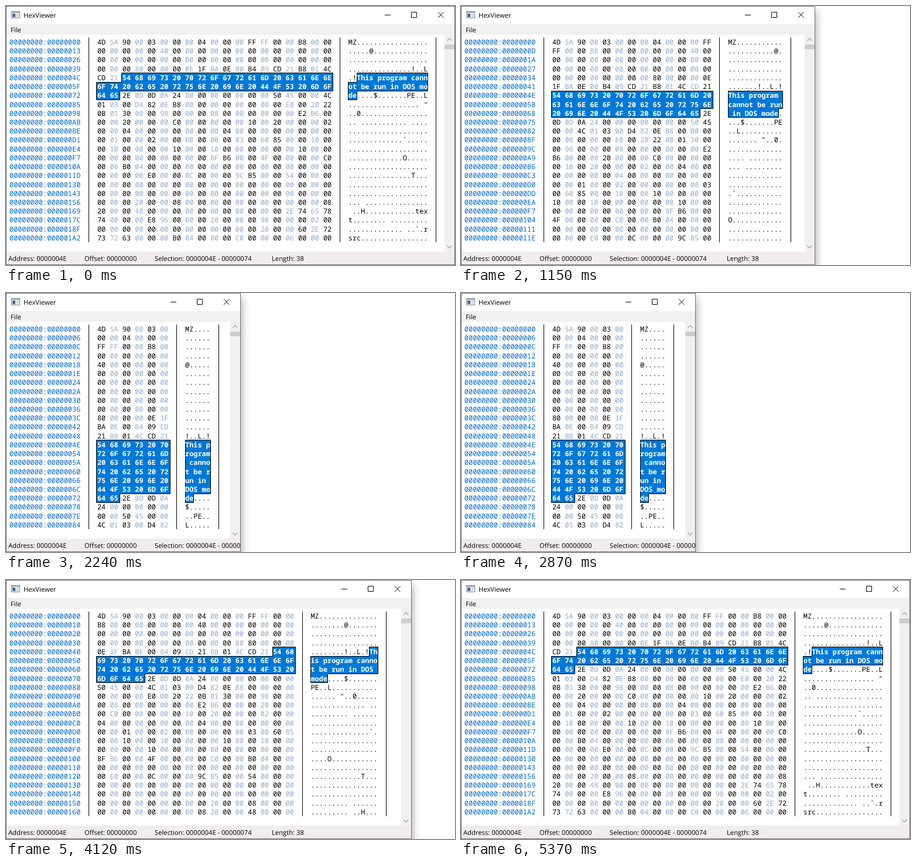
An HTML page for the animation above (5750 ms loop, 767 px wide and 443 px high).

```html
<!DOCTYPE html>
<html lang="en">
<head>
<meta charset="utf-8">
<title>HexViewer</title>
<style>
  html, body { margin: 0; width: 100%; height: 100%; overflow: hidden; background: #fff; }
  svg { display: block; }
  text { white-space: pre; text-rendering: geometricPrecision; }
  .ui { font: 11.25px "Open Sans", "Noto Sans", sans-serif; }
  .mono { font: 500 11.9125px "Noto Sans Mono", "Liberation Mono", monospace; }
  .line { fill: none; stroke: #000; }
  .address { fill: #0066c4; }
  .pale { fill: #8fa9c8; }
  .picked { fill: #fff; font-weight: 600; }
</style>
</head>
<body>
<svg width="767" height="443" viewBox="0 0 767 443">
  <defs>
    <clipPath id="clip"><rect id="clipBox" height="443"/></clipPath>
    <filter id="blur" filterUnits="userSpaceOnUse" x="-60" y="-60" width="900" height="640">
      <feGaussianBlur stdDeviation="8"/>
    </filter>
  </defs>
  <rect width="767" height="443" fill="#fff"/>
  <rect id="shadow" y="8" height="520" fill="#000" opacity=".42" filter="url(#blur)"/>
  <g clip-path="url(#clip)">
    <rect width="767" height="443" fill="#fff"/>
    <rect y="31" width="767" height="18" fill="#f0f0f0"/>
    <rect y="420" width="767" height="23" fill="#f1eded"/>
    <g id="icon">
      <rect x="9.5" y="9.5" width="14" height="11" fill="#f3f5f7" stroke="#7b848c"/>
      <rect x="10" y="10" width="13" height="2" fill="#aab4bd"/>
      <rect x="11" y="13" width="5" height="6" fill="#466a94"/>
      <rect x="17" y="13" width="5" height="6" fill="#d3dae0"/>
    </g>
    <g class="ui">
      <text x="30" y="20">HexViewer</text>
      <text x="8" y="45">File</text>
      <text x="4" y="436">Address: 0000004E</text>
      <text x="134" y="436">Offset: 00000000</text>
      <text x="254" y="436">Selection: 0000004E - 00000074</text>
      <text x="454" y="436">Length: 38</text>
    </g>
    <g id="dump" class="mono"></g>
    <!-- parts anchored to the right edge -->
    <g id="right">
      <path class="line" d="M-119 15.5h10M-73.5 10.5h9v9h-9zM-28 10.5l9.5 9.5M-18.5 10.5l-9.5 9.5"/>
      <rect x="-17" y="49" width="17" height="371" fill="#f0f0f0"/>
      <rect x="-17" y="66" width="17" height="8" fill="#cdcdcd"/>
      <path d="M-12.5 59.5l4-4 4 4M-12.5 410l4 4 4-4" fill="none" stroke="#a6a6b2" stroke-width="1.4"/>
    </g>
    <rect id="border" x=".5" y=".5" height="442" fill="none" stroke="#707070"/>
  </g>
</svg>
<script>
const LOOP = 5750;
const ROWS = 23;
const CH = 7.1475, LINE_H = 15.22;
const LEFT = 5.85, TOP = 54;
const HEX_X = LEFT + 21 * CH;
const SEL_START = 0x4E, SEL_TEXT = 'This program cannot be run in DOS mode';
const SEL_END = SEL_START + SEL_TEXT.length - 1;

// The viewed file: a PE header, written field by field.
const bytes = new Uint8Array(1024);
const view = new DataView(bytes.buffer);
const str = (at, s) => [...s].forEach((c, i) => { bytes[at + i] = c.charCodeAt(0); });
const words = (at, ...list) => list.forEach((v, i) => view.setUint32(at + 4 * i, v, true));

function section(at, name, size, address, rawSize, rawStart) {
  str(at, name);
  words(at + 8, size, address, rawSize, rawStart);
}

// DOS header and stub
words(0, 0x900000, 3, 4, 0xFFFF, 0xB8, 0, 0x40);
str(0, 'MZ');
words(0x3C, 0x80, 0x0EBA1F0E, 0xCD09B400, 0x4C01B821, 0x21CD);
str(SEL_START, SEL_TEXT + '.\r\r\n$');
// PE and optional header
str(0x80, 'PE');
words(0x84, 0x3014C, 0xB80E82D4);
words(0x94, 0x222000E0, 0x30010B, 0x9800, 0x800);
words(0xA8, 0xB6E2, 0x2000, 0xC000, 0x10000000, 0x2000, 0x200, 4, 0, 4);
words(0xD0, 0x10000, 0x200, 0, 0x85600003, 0x100000, 0x1000, 0x100000, 0x1000, 0, 0x10);
// data directories
words(0x100, 0xB68F, 0x4F, 0xC000, 0x4B0);
words(0x120, 0xE000, 0xC, 0xB59C, 0x54);
words(0x158, 0x2000, 8);
words(0x168, 0x2008, 0x48);
section(0x178, '.text', 0x96E8, 0x2000, 0x9800, 0x200);
words(0x19C, 0x60000020);
section(0x1A0, '.rsrc', 0x4B0, 0xC000, 0x600, 0x9A00);

// The right edge is dragged in equal time steps; keys are [step, position].
const SHRINK = { start: 300, pitch: 77.3, keys: [[-1, 766], [7, 693], [11, 604], [20, 457], [27, 377]] };
const GROW = { start: 2700, pitch: 78, keys: [[-1, 377], [2, 400], [11, 596], [18, 692], [23, 736], [32, 766]] };

function edgeAt(t) {
  const { start, pitch, keys } = t < GROW.start ? SHRINK : GROW;
  const last = keys[keys.length - 1];
  const step = Math.min(last[0], Math.max(-1, Math.floor((t - start) / pitch)));
  const i = Math.max(1, keys.findIndex(k => k[0] >= step));
  const [s0, a] = keys[i - 1], [s1, b] = keys[i];
  return Math.round(a + (b - a) * (step - s0) / (s1 - s0));
}

const $ = id => document.getElementById(id);
const hex = (v, len) => v.toString(16).toUpperCase().padStart(len, '0');
const selected = i => i >= SEL_START && i <= SEL_END;
const glyph = b => b >= 32 && b < 127 ? String.fromCharCode(b) : '.';
const snap = v => Math.floor(v) + 0.5;
const span = (x, kind, s) => `<tspan x="${x.toFixed(2)}" class="${kind}">${s}</tspan>`;

// Address, separators and text take 26 characters plus 4 per column.
const columnsFor = edge => Math.floor((edge - 28 - LEFT - 26 * CH) / (4 * CH));

function selection(cols, x, pitch, width, padL, padR) {
  const r0 = Math.floor(SEL_START / cols), r1 = Math.floor(SEL_END / cols);
  const from = c => snap(x + c * pitch - padL);
  const to = c => snap(x + c * pitch + width + padR);
  const y = r => snap(TOP + r * LINE_H);
  const l = from(0), r = to(cols - 1), s = from(SEL_START % cols), e = to(SEL_END % cols);
  return `<path d="M${s} ${y(r0)}H${r}V${y(r1)}H${e}V${y(r1 + 1)}H${l}V${y(r0 + 1)}H${s}Z"
    fill="#0078d7" stroke="#000"/>`;
}

function buildDump(cols) {
  const hexEnd = HEX_X + (3 * cols - 1) * CH;
  const textX = hexEnd + 4 * CH;
  const bars = [HEX_X - 2 * CH, hexEnd + 2 * CH, textX + (cols + 2) * CH];
  let out = bars.map(x => `<path class="line" d="M${snap(x)} ${TOP}v350"/>`).join('');
  out += selection(cols, HEX_X, 3 * CH, 2 * CH, 1.05, 2.6);
  out += selection(cols, textX, CH, CH, 0, 0.3);
  for (let r = 0; r < ROWS; r++) {
    const start = r * cols;
    let row = span(LEFT, 'address', '00000000:' + hex(start, 8));
    let run = '', runX = textX;
    for (let c = 0; c < cols; c++) {
      const i = start + c, on = selected(i);
      row += span(HEX_X + c * 3 * CH, on ? 'picked' : c % 2 ? 'pale' : '', hex(bytes[i], 2));
    }
    for (let c = 0; c < cols; c++) {
      const i = start + c;
      run += glyph(bytes[i]);
      if (c === cols - 1 || selected(i) !== selected(i + 1)) {
        row += span(runX, selected(i) ? 'picked' : '', run);
        runX = textX + (c + 1) * CH;
        run = '';
      }
    }
    out += `<text y="${Math.round(66 + r * LINE_H)}">${row}</text>`;
  }
  $('dump').innerHTML = out;
}

let shownEdge = 0, shownCols = 0;

function draw(t) {
  const edge = edgeAt(t);
  if (edge === shownEdge) return;
  shownEdge = edge;
  const cols = columnsFor(edge);
  if (cols !== shownCols) buildDump(shownCols = cols);
  $('clipBox').setAttribute('width', edge + 1);
  $('shadow').setAttribute('width', edge + 1);
  $('border').setAttribute('width', edge);
  $('right').setAttribute('transform', `translate(${edge} 0)`);
}

function tick() {
  draw(performance.now() % LOOP);
  requestAnimationFrame(tick);
}
tick();
</script>
</body>
</html>
```
